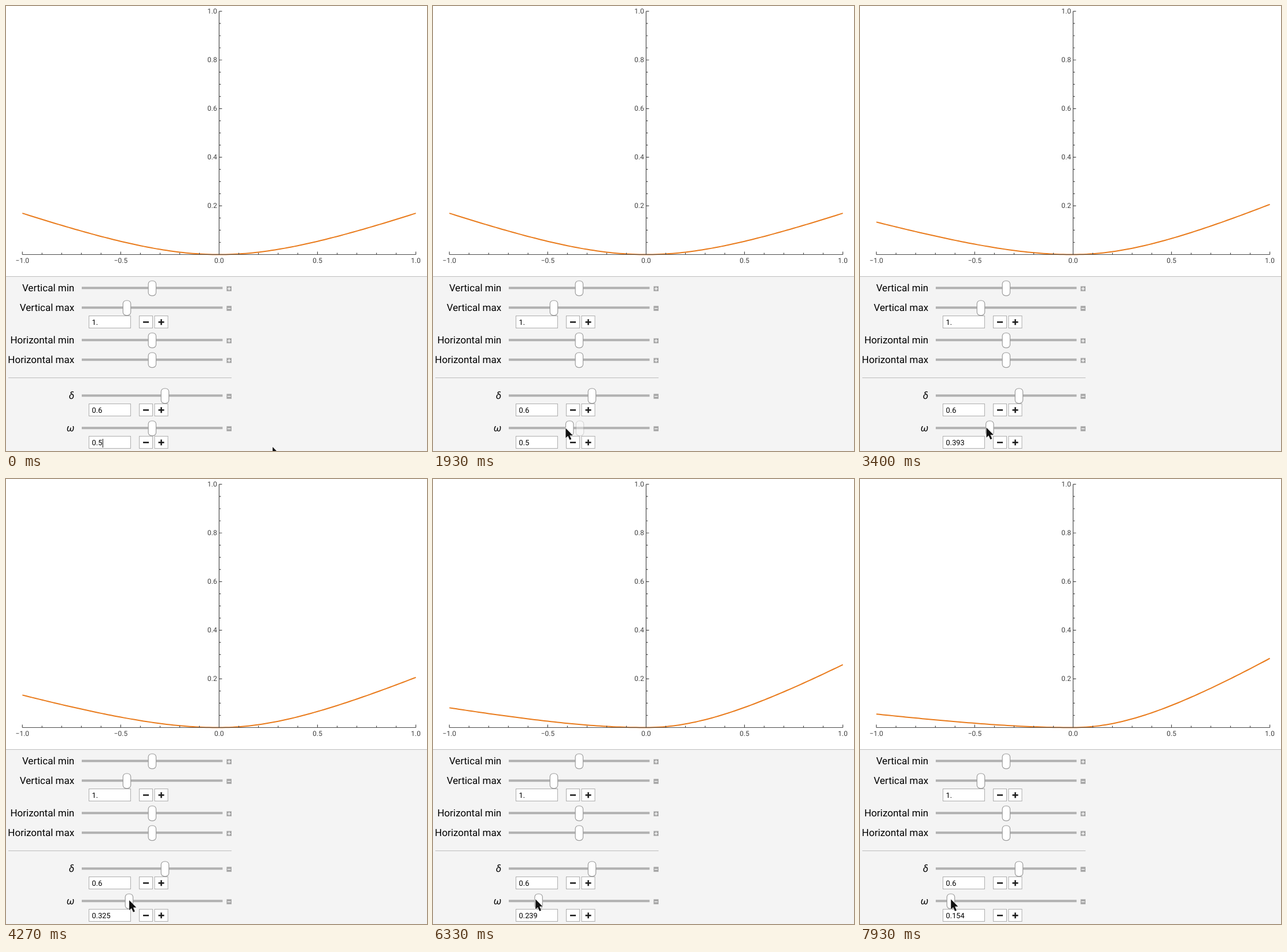
An HTML page that plays this animation: 728x769 px, repeating every 8 s.

```html
<!DOCTYPE html>
<html lang="en">
<head>
<meta charset="utf-8">
<title>Loss curve controls</title>
<style>
  html, body { margin: 0; width: 100%; height: 100%; overflow: hidden; background: #fff; }
  svg { display: block; font-family: Roboto, Arial, sans-serif; text-rendering: geometricPrecision; }
  .axis { stroke: #4c4c4c; stroke-width: 1.2; fill: none; }
  .tick-label { font-size: 12px; fill: #404040; }
  .name { font-size: 17px; fill: #000; text-anchor: end; }
  .symbol { font-style: italic; }
  .value { font-size: 12.8px; fill: #000; }
  .track { stroke: #b1b1b1; stroke-width: 4; }
  .handle { fill: #fff; stroke: #9c9c9c; stroke-width: 1.2; }
  .box { fill: #fff; stroke: #adadad; }
  .sign { stroke: #1c1c1c; stroke-width: 2.5; fill: none; }
  .rule { stroke: #bdbdbd; }
</style>
</head>
<body>
<svg id="stage" width="728" height="769" viewBox="0 0 728 769"></svg>
<script>
const LOOP = 8000;
const FPS = 15;
const DELTA = 0.6;
const ORIGIN = { x: 368.5, y: 429.5 };
const UNIT = { x: 340.2, y: 420.3 };

const stage = document.getElementById("stage");

function add(tag, attrs, text) {
  const el = document.createElementNS("http://www.w3.org/2000/svg", tag);
  for (const key in attrs) el.setAttribute(key, attrs[key]);
  if (text !== undefined) el.textContent = text;
  stage.appendChild(el);
  return el;
}
const path = (cls, d) => add("path", { class: cls, d });

const px = x => ORIGIN.x + x * UNIT.x;
const py = y => ORIGIN.y - y * UNIT.y;
const signed = v => v.toFixed(1).replace("-", "\u2212");

function drawAxes() {
  let d = `M${px(-1)} ${ORIGIN.y}H${px(1)}M${ORIGIN.x} ${py(1)}V${ORIGIN.y}`;
  for (let i = -10; i <= 10; i++) {
    const major = i % 5 === 0;
    d += `M${px(i / 10)} ${ORIGIN.y}v${major ? -5 : -3}`;
    if (major) add("text", { class: "tick-label", x: px(i / 10), y: 444, "text-anchor": "middle" }, signed(i / 10));
  }
  for (let i = 1; i <= 20; i++) {
    const major = i % 4 === 0;
    d += `M${ORIGIN.x} ${py(i / 20)}h${major ? 5 : 3}`;
    if (major) add("text", { class: "tick-label", x: 365, y: py(i / 20) + 4, "text-anchor": "end" }, signed(i / 20));
  }
  path("axis", d);
}

// Smooth Huber loss, weighted by w on the left and 1 - w on the right.
function curvePath(w) {
  const points = [];
  for (let i = -60; i <= 60; i++) {
    const x = i / 60;
    const loss = DELTA ** 2 * (Math.sqrt(1 + (x / DELTA) ** 2) - 1);
    points.push(px(x).toFixed(2) + " " + py(loss * (x < 0 ? w : 1 - w)).toFixed(2));
  }
  return "M" + points.join("L");
}

const handleX = w => 252.8 + (w - 0.5) * 228;
const addHandle = (x, y) => add("rect", { class: "handle", x: x - 6.7, y: y - 12.3, width: 13.4, height: 25.6, rx: 5.5 });

function addSlider(label, y, level, value) {
  const open = value !== undefined;
  const symbol = label.length === 1;
  add("text", { class: symbol ? "name symbol" : "name", x: 118.2, y: y + 5.4 }, label);
  path("track", `M131 ${y}H374.5`);
  add("rect", { x: 381.5, y: y - 3, width: 8.5, height: 8.5, fill: "#a6a6a6" });
  add("path", { d: `M383 ${y + 1.25}h5.5` + (open ? "" : `M385.75 ${y - 1.5}v5.5`), stroke: "#fff", "stroke-width": 1.3 });

  let text;
  if (open) {
    const mid = y + 25;
    const box = (left, width) => add("rect", { class: "box", x: left, y: Math.round(mid) - 10.5, width, height: 21 });
    box(143.5, 72);
    box(230.5, 23);
    box(257, 23);
    path("sign", `M237 ${mid}h10M263.5 ${mid}h10M268.5 ${mid - 5}v10`);
    text = add("text", { class: "value", x: 148.6, y: mid + 4.8 }, value);
  }
  return { handle: addHandle(handleX(level), y), text };
}

const curve = add("path", { fill: "none", stroke: "#e97b1c", "stroke-width": 2 });
drawAxes();

add("rect", { y: 467, width: 728, height: 302, fill: "#f4f4f4" });
path("rule", "M0 467.5H728M4 642.5H390");
addSlider("Vertical min", 487.3, 0.5);
addSlider("Vertical max", 521.3, 0.308, "1.");
addSlider("Horizontal min", 577.3, 0.5);
addSlider("Horizontal max", 611.3, 0.5);
addSlider("\u03b4", 673.3, 0.597, "0.6");
const omega = addSlider("\u03c9", 729.3, 0.5, "0.5");
const ghost = addHandle(254, 729.3);
ghost.setAttribute("opacity", 0.35);
stage.insertBefore(ghost, omega.handle);
const caret = add("path", { d: "M167.5 748V763", stroke: "#111" });
const cursor = add("path", {
  d: "M0 0V17.2L3.9 13.6L6.9 20.4L9.8 19.1L6.9 12.5H12.3Z",
  fill: "#111", stroke: "#fff", "stroke-width": 1.1, "paint-order": "stroke"
});

// Each drag starts at `at` and ends on `w`. The field shows `draft` first,
// settles at `text`, and the plot catches up at `plot`.
const DRAG = 450, LAG = 120, DRAFT = 550;
const drags = [
  { at: 1530, w: 0.393, text: 2330, plot: 2670 },
  { at: 3130, w: 0.325, draft: 0.334, text: 4270, plot: 4400 },
  { at: 4720, w: 0.239, draft: 0.244, text: 5670, plot: 5800 },
  { at: 5950, w: 0.163, text: 6670, plot: 7070 },
  { at: 7330, w: 0.08, draft: 0.154, text: LOOP, plot: LOOP }
];

const mix = (a, b, u) => a + (b - a) * u;

function ease(u) {
  const c = Math.min(1, Math.max(0, u));
  return c * c * (3 - 2 * c);
}

const dragged = t => drags.reduce((w, drag) => mix(w, drag.w, ease((t - drag.at) / DRAG)), 0.5);

function fieldValue(t) {
  let value = 0.5;
  for (const drag of drags) {
    if (drag.draft && t >= drag.at + DRAFT) value = drag.draft;
    if (t >= drag.text) value = drag.w;
  }
  return value;
}

const plotted = t => drags.reduce((w, drag) => t >= drag.plot ? drag.w : w, 0.5);

function cursorAt(t) {
  const x = handleX(dragged(t)) + 0.2;
  const y = Math.max(726.3, 731.3 - (253 - x) * 0.08);
  const arrived = ease(t / 800);
  return [mix(461, x, arrived), mix(762, y, arrived)];
}

function render(time) {
  const tick = Math.floor((time + 5) * FPS / 1000);
  const t = Math.round(tick * 100 / FPS) * 10;
  omega.handle.setAttribute("x", handleX(dragged(t - LAG)) - 6.7);
  omega.text.textContent = fieldValue(t);
  curve.setAttribute("d", curvePath(plotted(t)));
  cursor.setAttribute("transform", `translate(${cursorAt(t)})`);
  caret.style.display = t < 270 || (t >= 800 && t < 1330) ? "" : "none";
  ghost.style.display = t >= 1870 && t < 2000 ? "" : "none";
}

const start = performance.now();
function loop() {
  render((performance.now() - start) % LOOP);
  requestAnimationFrame(loop);
}
loop();
</script>
</body>
</html>
```
